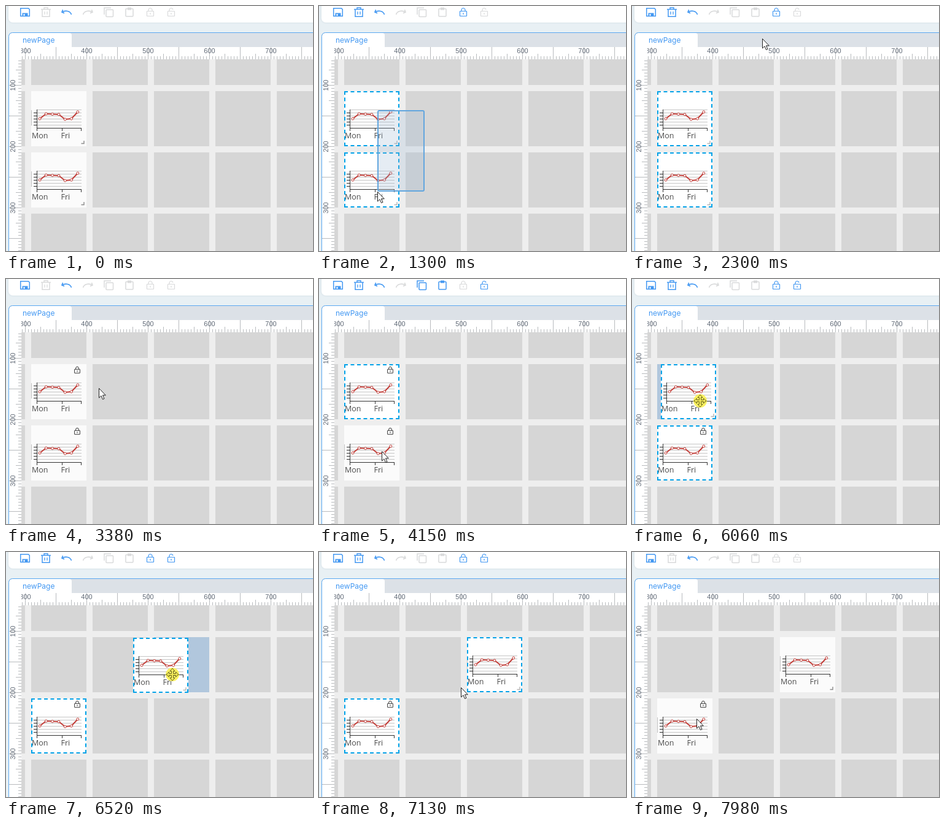
An HTML page with a canvas that plays this animation: 500x400 px, repeating every 8 s.

```html
<!DOCTYPE html>
<html lang="en">
<head>
<meta charset="utf-8">
<title>Page editor</title>
<style>
  html, body { margin: 0; width: 100%; height: 100%; overflow: hidden; background: #e8f0f4; }
  canvas { display: block; width: 500px; height: 400px; }
</style>
</head>
<body>
<canvas id="stage" width="500" height="400"></canvas>
<script>
const ctx = document.getElementById('stage').getContext('2d');
const LOOP = 8000, STEP = 76.7;
const BLUE = '#4398f2', OFF = '#d9dadb', DASH = '#00a2e8', TICK = '#b8bbbe';
const CELL = 90, PITCH = 100;
const RULER = { x: 25, y: 87 };
const RULER_FONT = '11px "Liberation Sans", Arial, sans-serif';
const CHART_FONT = '12.5px "Open Sans", "Noto Sans", sans-serif';
const HOLD = 90; // the button stays down this long after a gesture

// Pointer gestures: each eases from the previous resting place
const go = (start, end, x, y, act) => ({ start, end, x, y, act });
const GESTURES = [
  go(70, 70, 373, 325),
  go(70, 850, 171, 170),
  go(920, 1290, 95, 303, 'marquee'),
  go(1390, 1680, 154, 183),
  go(1680, 1830, 81, 308),
  go(1990, 2400, 235, 9),
  go(2690, 3140, 151, 178),
  go(3390, 3750, 109, 158),
  go(3990, 4140, 102, 281),
  go(4290, 4560, 264, 9),
  go(4660, 4900, 156, 266),
  go(4930, 5250, 168, 170),
  go(5300, 5600, 96, 300, 'marquee'),
  go(5690, 5900, 105, 199),
  go(5990, 6623, 284, 200, 'drag'),
  go(6830, 7590, 133, 260),
  go(7670, 7970, 105, 272)
];

const within = (t, ...spans) => spans.some(([a, b]) => t >= a && t < b);
const clamp = u => Math.max(0, Math.min(1, u));
const ease = u => u * u * (3 - 2 * u);

function pointerAt(t) {
  const i = GESTURES.findLastIndex(g => t >= g.start);
  if (i < 0) return null;
  const to = GESTURES[i], from = GESTURES[Math.max(0, i - 1)];
  const f = ease(clamp((t - to.start) / (to.end - to.start || 1)));
  const act = t < to.end + HOLD ? to.act : undefined;
  return {
    from, act,
    x: Math.round(from.x + (to.x - from.x) * f),
    y: Math.round(from.y + (to.y - from.y) * f)
  };
}

function box(x, y, w, h, color) {
  ctx.fillStyle = color;
  ctx.fillRect(x, y, w, h);
}

function panel(x, y, w, h, r, fill, stroke, width = 1) {
  ctx.beginPath();
  ctx.roundRect(x, y, w, h, r);
  if (fill) {
    ctx.fillStyle = fill;
    ctx.fill();
  }
  if (stroke) {
    ctx.strokeStyle = stroke;
    ctx.lineWidth = width;
    ctx.stroke();
  }
}

function line(points, color, width = 1, close = false) {
  ctx.beginPath();
  points.forEach(([x, y]) => ctx.lineTo(x, y));
  if (close) ctx.closePath();
  ctx.strokeStyle = color;
  ctx.lineWidth = width;
  ctx.stroke();
}

function label(text, x, y, font, color, align = 'left') {
  ctx.font = font;
  ctx.fillStyle = color;
  ctx.textAlign = align;
  ctx.fillText(text, x, y);
}

function at(x, y, draw) {
  ctx.save();
  ctx.translate(x, y);
  draw();
  ctx.restore();
}

function padlock(color, open) {
  panel(-5.5, -1.5, 11, 8, 0.5, null, color, 1.2);
  ctx.beginPath();
  ctx.moveTo(-3, -1.5);
  ctx.arc(0, -3.5, 3, Math.PI, open ? -0.2 : 0);
  if (!open) ctx.lineTo(3, -1.5);
  ctx.stroke();
  line([[0, 1], [0, 4]], color, 1.2);
}

function save() {
  line([[-7.3, -6.3], [5.5, -6.3], [7.3, -4.5], [7.3, 6.6], [-7.3, 6.6]], BLUE, 1.5, true);
  box(-4.5, 1.5, 9, 5, BLUE);
  box(-2.5, 3, 2, 3, '#fff');
}

function trash(color) {
  line([[-8, -4.5], [8, -4.5]], color, 1.5);
  line([[-3, -5], [-3, -7.3], [3, -7.3], [3, -5]], color, 1.4);
  line([[-6, -4], [-6, 7.2], [6, 7.2], [6, -4]], color, 1.5);
  for (const x of [-2, 2]) line([[x, -1], [x, 4]], color, 1.3);
}

function turnArrow(color, flip) {
  ctx.scale(flip, 1);
  ctx.beginPath();
  ctx.moveTo(-8, 0);
  ctx.bezierCurveTo(-2, -3.5, 6, -2, 7.5, 4);
  ctx.strokeStyle = color;
  ctx.lineWidth = 1.6;
  ctx.stroke();
  line([[-6.5, -4], [-8, 0], [-4, 1.8]], color, 1.6);
}

function copy(color) {
  panel(-4, -4, 11.5, 11.5, 1, null, color, 1.5);
  line([[-7, 4], [-7, -7], [4, -7]], color, 1.5);
}

function paste(color) {
  panel(-6, -5.5, 12, 12.5, 1, null, color, 1.5);
  box(-3, -7.5, 6, 4, color);
}

function toolbar(items) {
  const chosen = items.filter(i => i.selected);
  const tone = on => on ? BLUE : OFF;
  const single = tone(chosen.length === 1);
  ctx.save();
  ctx.shadowColor = 'rgba(90,120,150,.2)';
  ctx.shadowBlur = 3;
  panel(4, -20, 520, 47, 7, '#fff');
  ctx.restore();
  [
    save,
    () => trash(tone(chosen.length)),
    () => turnArrow(BLUE, 1),
    () => turnArrow(OFF, -1),
    () => copy(single),
    () => paste(single),
    () => padlock(tone(chosen.some(i => !i.locked)), false),
    () => padlock(tone(chosen.some(i => i.locked)), true)
  ].forEach((icon, i) => at(31 + 34 * i, 10, icon));
}

// One ruler along the x axis; marks sit on y = 0 and grow upwards
function ruler(first, last, place) {
  for (let v = first; v <= last; v += 5) {
    const size = v % 50 === 0 ? 20 : v % 25 === 0 ? 9 : 5;
    line([[place(v), 0], [place(v), -size]], TICK);
  }
  for (let v = Math.ceil(first / 100) * 100; v <= last; v += 100)
    label(v, place(v), -10, RULER_FONT, '#626b78', 'center');
}

function frame() {
  panel(4, 43, 520, 400, [6, 0, 0, 0], '#dce1e7');
  box(5, 67, 495, 333, '#fff');
  panel(5, 44, 102, 24, [5, 4, 0, 0], '#fff');
  label('newPage', 27, 60, '12px Inter, sans-serif', BLUE);

  ctx.save();
  ctx.beginPath();
  ctx.rect(RULER.x, 67, 475, 20);
  ctx.clip();
  at(0, RULER.y, () => ruler(295, 770, v => v - 268.5));
  ctx.restore();
  at(RULER.x, 0, () => {
    ctx.rotate(-Math.PI / 2);
    at(0, 0, () => {
      ctx.translate(0, 0);
      ruler(60, 370, v => -v - 29.5);
    });
  });
  panel(4.5, 43.5, 520, 400, [6, 0, 0, 0], null, '#5ba8f0');
}

function grid() {
  ctx.save();
  ctx.beginPath();
  ctx.rect(RULER.x, RULER.y, 475, 313);
  ctx.clip();
  box(0, 0, 500, 400, '#eee');
  for (let x = -59; x < 500; x += PITCH)
    for (let y = 39; y < 400; y += PITCH) box(x, y, CELL, CELL, '#d6d6d6');
  ctx.restore();
}

function chart() {
  line([[0.5, 31], [0.5, 56]], '#c4c4c4');
  for (let y = 30.5; y < 60; y += 5) {
    line([[10, y], [82, y]], '#c6c6c6');
    if (y > 31) line([[4, y], [9, y]], '#333');
  }
  line([[9.5, 30], [9.5, 65]], '#333');
  line([[9, 60.5], [82, 60.5]], '#333');
  for (const x of [50.5, 81.5]) line([[x, 61], [x, 65]], '#333');

  const points = [45, 37, 37.5, 38, 46, 45, 34].map((y, i) => [14 + i * 10.3, y]);
  line(points, '#c23f3a', 2);
  for (const [x, y] of points) {
    ctx.beginPath();
    ctx.arc(x, y, 2, 0, 7);
    ctx.fillStyle = '#fff';
    ctx.fill();
    ctx.lineWidth = 1;
    ctx.stroke();
  }
  label('Mon', 1, 77, CHART_FONT, '#4c4c4c');
  label('Fri', 48.5, 77, CHART_FONT, '#4c4c4c');
}

function card(item) {
  at(item.x, item.y, () => {
    box(0, 0, CELL, CELL, item.selected ? '#fff' : '#fbfbfb');
    chart();
    if (item.locked) at(75, 9.5, () => {
      ctx.scale(0.8, 0.8);
      padlock('#333', false);
    });
    else line([[81.5, 85.5], [86, 85.5], [86, 81]], item.selected ? '#b5b5b5' : '#8c8c8c', 1.4);
    if (item.selected) {
      ctx.setLineDash([6, 4.5]);
      for (const p of [1, CELL - 1]) {
        line([[0, p], [CELL, p]], DASH, 2);
        line([[p, 0], [p, CELL]], DASH, 2);
      }
      ctx.setLineDash([]);
    }
  });
}

function marquee({ from, x, y }) {
  const left = Math.min(from.x, x), top = Math.min(from.y, y);
  panel(left + 1, top + 1, Math.abs(from.x - x) - 1, Math.abs(from.y - y) - 2, 2,
    'rgba(150,180,205,.25)', '#62a6de', 2);
}

function arrowCursor() {
  ctx.beginPath();
  [[0.5, 0.5], [0.5, 16], [4, 12.7], [6.5, 18.5], [9, 17.4], [6.5, 11.8], [11.3, 11.8]]
    .forEach(([x, y]) => ctx.lineTo(x, y));
  ctx.closePath();
  ctx.fillStyle = '#fff';
  ctx.fill();
  ctx.strokeStyle = '#222';
  ctx.lineWidth = 1;
  ctx.stroke();
}

function moveCursor() {
  panel(-11, -11, 22, 22, 11, 'rgba(250,240,70,.85)');
  for (let i = 0; i < 4; i++) {
    ctx.rotate(Math.PI / 2);
    line([[1.5, -1.5], [5.5, -1.5], [5.5, -4], [10, 0], [5.5, 4], [5.5, 1.5], [1.5, 1.5]], '#65601c');
  }
}

function draw(t) {
  const pointer = pointerAt(t);
  const act = pointer?.act;
  const drop = GESTURES.find(g => g.act === 'drag').end + HOLD;
  const upper = {
    x: t >= drop ? 241 : 41, y: 139,
    selected: within(t, [1080, 3200], [3980, 5220], [5470, 7750]),
    locked: within(t, [2500, 4620])
  };
  const lower = {
    x: 41, y: 239,
    selected: within(t, [1130, 3200], [5470, 7750]),
    locked: t >= 2500
  };
  if (act === 'drag') {
    upper.x += pointer.x - pointer.from.x;
    upper.y += pointer.y - pointer.from.y;
  }

  box(0, 0, 500, 400, '#e8f0f4');
  toolbar([upper, lower]);
  frame();
  grid();
  if (act === 'drag') {
    const slot = Math.round((upper.x - 41) / PITCH);
    box(41 + slot * PITCH, 139, CELL, CELL, '#b1c7dd');
  }
  card(lower);
  card(upper);
  if (act === 'marquee') marquee(pointer);
  if (pointer) at(pointer.x, pointer.y, act === 'drag' ? moveCursor : arrowCursor);
}

// The screen refreshes in even steps
function tick(now) {
  draw(Math.floor((now % LOOP + 7) / STEP) * STEP);
  requestAnimationFrame(tick);
}
requestAnimationFrame(tick);
</script>
</body>
</html>
```
